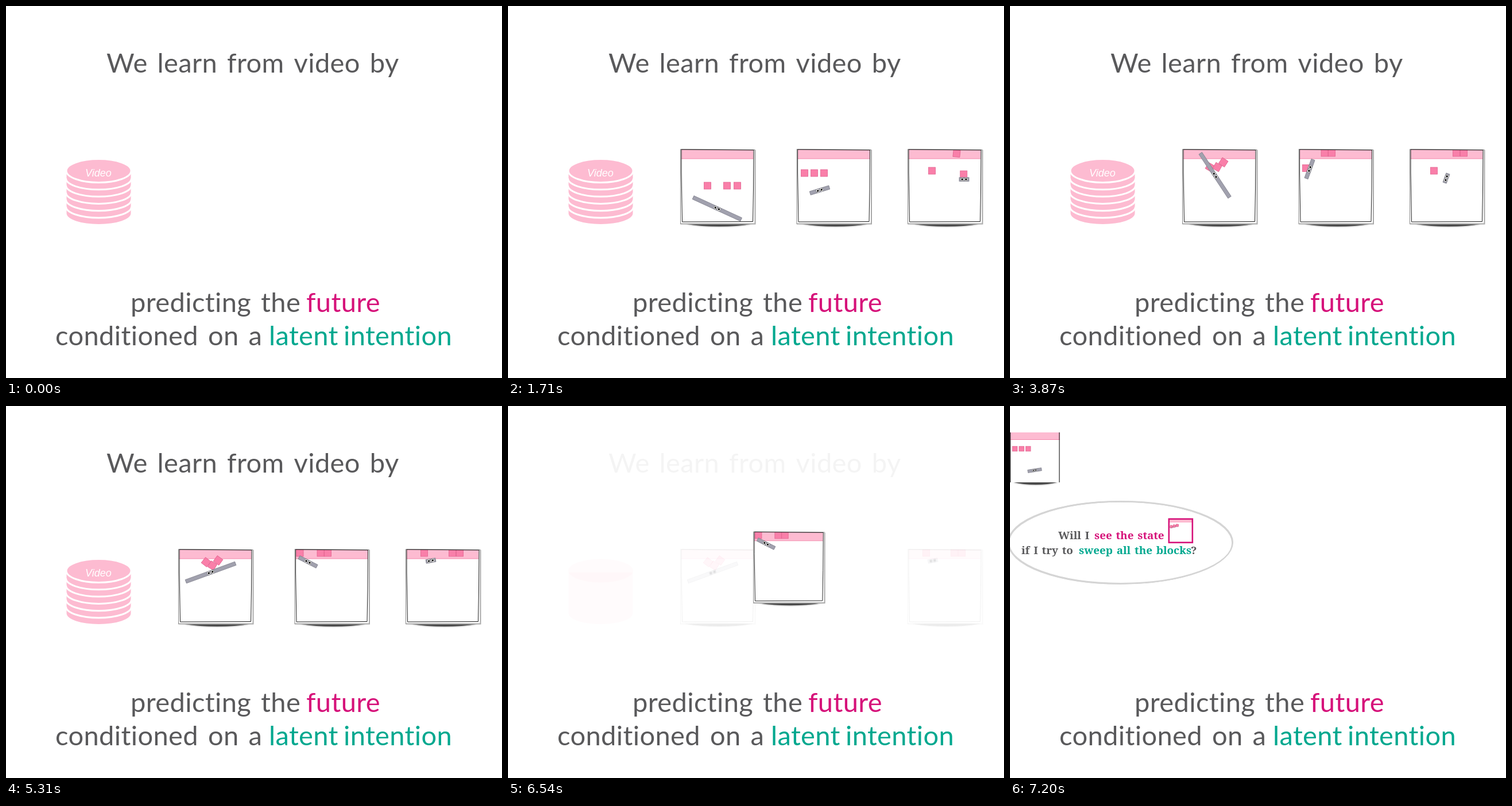
Write an HTML page with a canvas that moves like this. It is 864x648 px and loops after 8000 ms.

```html
<!DOCTYPE html>
<html lang="en">
<head>
<meta charset="utf-8">
<title>Learning from video</title>
<style>
html, body { margin: 0; height: 100%; overflow: hidden; background: #fff; }
canvas { display: block; }
</style>
</head>
<body>
<canvas id="stage" width="864" height="648"></canvas>
<script>
const c = document.getElementById('stage').getContext('2d');
const LOOP = 8000, GRAY = '#59595b', MAGENTA = '#d6127a', TEAL = '#00a88f', PINK = '#fdbbd1';
const clamp = v => Math.max(0, Math.min(1, v));
const ramp = (t, from, to) => clamp((t - from) / (to - from));
const ease = v => (1 - Math.cos(Math.PI * v)) / 2;
const mix = (a, b, k) => a + (b - a) * k;
const mixPose = (a, b, k) => a.map((v, i) => mix(v, b[i], k));

// Poses are [x, y, degrees] inside a card's picture
const STOPS = [1440, 1710, 2970, 3870, 5310];
const travel = (...poses) => t => {
  const i = Math.max(0, STOPS.findLastIndex((s, n) => s <= t && n < 4));
  return mixPose(poses[i], poses[i + 1], ramp(t, STOPS[i], STOPS[i + 1]));
};
// A block slows down as it reaches its goal
const push = (from, to, start, end) => t =>
  mixPose(from, to, Math.sin(ramp(t, start, end) * Math.PI / 2));

// The long bar rises while it turns at a steady rate
function turn(t) {
  const rise = ease(ramp(t, 1440, 4400));
  const angle = t < 2250 ? mix(20, 34, ramp(t, 1440, 2250)) : Math.min(340, 34 + (t - 2250) / 8);
  return [63 - 8 * rise, 104 - 64 * rise, angle];
}

const cards = [
  { x: 301.5, len: 92, agent: turn, blocks: [
    push([46, 63, 0], [47, 22, 38], 3150, 4400),
    push([80, 63, 0], [58, 28, 32], 2250, 4400),
    push([98, 63, 0], [68, 19, 36], 2250, 4400)] },
  { x: 504, len: 35,
    agent: travel([62, 96, -10], [39, 71, -17], [49, 15, 0], [18, 34, -70], [22, 21.5, 27]),
    blocks: [
      push([12.5, 41, 0], [8, 6, 0], 3600, 5310),
      push([29.5, 41, 0], [44, 6, 0], 2070, 2970),
      push([46.5, 41, 0], [56.5, 6, 0], 2070, 2970)] },
  { x: 697.5, len: 17,
    agent: travel([97, 62, 0], [97, 52, 0], [93, 14.5, 0], [62.5, 50, -70], [42.5, 19.5, -10]),
    blocks: [
      push([84, 7, 6], [80, 6, 0], 1710, 2970),
      push([41, 37, 0], [31, 6, 0], 4590, 5310),
      push([97.5, 57, 0], [93, 6, 0], 1440, 2970)] }
];

function group(alpha, x, y, scale, draw) {
  if (alpha <= 0) return;
  c.save();
  c.globalAlpha *= alpha;
  c.translate(x, y);
  c.scale(scale, scale);
  draw();
  c.restore();
}

function posed([x, y, deg], draw) {
  c.save();
  c.translate(x, y);
  c.rotate(deg * Math.PI / 180);
  draw();
  c.restore();
}

function box(w, h, fill, stroke) {
  c.fillStyle = fill;
  c.strokeStyle = stroke;
  c.lineWidth = .8;
  c.fillRect(-w / 2, -h / 2, w, h);
  c.strokeRect(-w / 2, -h / 2, w, h);
}

function dot(x, y, r, fill) {
  c.fillStyle = fill;
  c.beginPath();
  c.arc(x, y, r, 0, 7);
  c.fill();
}

function line(width, color, ...p) {
  c.lineWidth = width;
  c.strokeStyle = color;
  c.beginPath();
  for (let i = 0; i < p.length; i += 2) c.lineTo(p[i], p[i + 1]);
  c.stroke();
}

const block = (pose, size = 12) => posed(pose, () => box(size, size, '#f97fa9', '#e0628e'));

const agent = (pose, len, thick = 6.5, eye = 2.8) => posed(pose, () => {
  box(len, thick, '#a1a1ae', '#83838f');
  for (const x of [-1.2 * eye, 1.2 * eye]) {
    dot(x, 0, eye + .4, '#555');
    dot(x, 0, eye, '#fff');
    dot(x, 0, eye * .6, '#000');
  }
});

function band(w, h) {
  c.fillStyle = PINK;
  c.fillRect(0, 0, w, h);
  line(1, '#f389ab', 0, h, w, h);
}

// Shadow under the lifted lower edge
function curl(w, y, depth) {
  c.save();
  c.shadowColor = '#666';
  c.shadowBlur = 3;
  c.fillStyle = '#4a4a4a';
  c.beginPath();
  c.moveTo(w * .05, y);
  c.lineTo(w * .97, y);
  c.quadraticCurveTo(w * .52, y + depth, w * .05, y);
  c.fill();
  c.restore();
}

function card({ len, agent: bar, blocks }, t) {
  curl(129, 129.5, 9);
  c.fillStyle = '#fff';
  c.fillRect(-1.5, -1, 131, 131);
  c.save();
  c.beginPath();
  c.rect(0, 0, 126, 126);
  c.clip();
  band(126, 16);
  blocks.forEach(b => block(b(t)));
  agent(bar(t), len);
  c.restore();
  line(2, '#aaa', 129, 1, 129, 129.5, -1, 129.5);
  line(1, '#888', -1, 130, -1, -.5, 129, .5);
  line(1, '#222', .5, 0, 126.5, 1, 126, 70, 125, 125.5, 2, 126, .5, 40, .5, 0);
}

function startCard() {
  curl(87, 86.5, 9);
  c.fillStyle = '#fff';
  c.fillRect(0, 0, 87, 87);
  band(87, 12.5);
  for (let i = 0; i < 3; i++) block([8.5 + i * 11.6, 28.5, 0], 8.5);
  agent([43, 66, -9], 24, 5, 1.8);
  for (const x of [.5, 86]) line(1.2, '#222', x, 0, x, 87);
}

const SANS = { font: '47px Lato, "Open Sans", sans-serif', letterSpacing: '0.4px', wordSpacing: '4.5px' };
const SERIF = { font: 'bold 18.8px "Noto Serif", serif', letterSpacing: '0px', wordSpacing: '2px' };
const LABEL = { font: 'italic 18px "Liberation Sans", Arial, sans-serif', letterSpacing: '0px', wordSpacing: '0px' };

function write(style, text, x, y, color = GRAY) {
  Object.assign(c, style);
  c.fillStyle = color;
  c.fillText(text, x, y);
}

function caption() {
  write(SANS, 'predicting the', 217, 533);
  write(SANS, 'future', 523, 533, MAGENTA);
  write(SANS, 'conditioned on a', 86, 591);
  write(SANS, 'latent', 458, 591, TEAL);
  write(SANS, 'intention', 588, 591, TEAL);
}

function database() {
  c.fillStyle = PINK;
  c.beginPath();
  c.moveTo(105.5, 290);
  c.lineTo(105.5, 361);
  c.ellipse(161.5, 361, 56, 19, 0, Math.PI, 0, true);
  c.lineTo(217.5, 290);
  c.fill();
  c.strokeStyle = '#fff';
  c.lineWidth = 3;
  for (let i = 1; i < 6; i++) {
    c.beginPath();
    c.ellipse(161.5, 288 + i * 12.3, 57, 19.5, 0, 0, Math.PI);
    c.stroke();
  }
  c.beginPath();
  c.ellipse(161.5, 287, 56.5, 20.5, 0, 0, 7);
  c.fill();
  c.stroke();
  write(LABEL, 'Video', 138, 297, '#fff');
}

function question() {
  c.strokeStyle = '#d5d5d5';
  for (let i = 0; i < 4; i++) {
    c.lineWidth = 2 - i * .3;
    c.beginPath();
    c.ellipse(193 - i % 2, 237.5 + i * .4, 195, 71.5, .005 * Math.sin(i * 2), 0, 7);
    c.stroke();
  }
  write(SERIF, 'Will I', 84, 232);
  write(SERIF, 'see the state', 147, 232, MAGENTA);
  write(SERIF, 'if I try to', 20, 258);
  write(SERIF, 'sweep all the blocks', 120, 258, TEAL);
  write(SERIF, '?', 315, 258);
  c.fillStyle = PINK;
  c.fillRect(278, 198, 39, 5);
  posed([286, 210, -15], () => box(14, 2, '#a1a1ae', '#a1a1ae'));
  for (let i = 0; i < 3; i++) block([281 + i * 5.2, 210 - i, 8], 4);
  c.strokeStyle = MAGENTA;
  c.lineWidth = 2.6;
  c.strokeRect(276.8, 196.8, 41, 41);
}

function draw(t) {
  c.fillStyle = '#fff';
  c.fillRect(0, 0, 864, 648);
  caption();

  const [left, middle, right] = cards;
  const play = 1440 + Math.floor(Math.max(0, t - 1440) / 90) * 90;
  const shown = ramp(t, 690, 1440);
  group(1 - ramp(t, 6300, 6558), 0, 0, 1, () => {
    write(SANS, 'We learn from video by', 175, 116);
    database();
    for (const side of [left, right]) group(shown, side.x, 250, 1, () => card(side, play));
  });
  group(ease(ramp(t, 6850, 7200)), 0, 0, 1, question);

  // The middle card shrinks into the corner and turns into the start state
  const move = ease(ramp(t, 6318, 7200));
  const swap = ramp(move, .25, 1);
  const x = mix(middle.x, 0, move), y = mix(250, 46, move), scale = mix(1, 87 / 126, move);
  group(shown * Math.min(1, 2 - 2 * swap), x, y, scale, () => card(middle, play));
  group(swap, x, y, scale * 126 / 87, startCard);
}

function tick() {
  draw(performance.now() % LOOP);
  requestAnimationFrame(tick);
}
tick();
</script>
</body>
</html>
```
